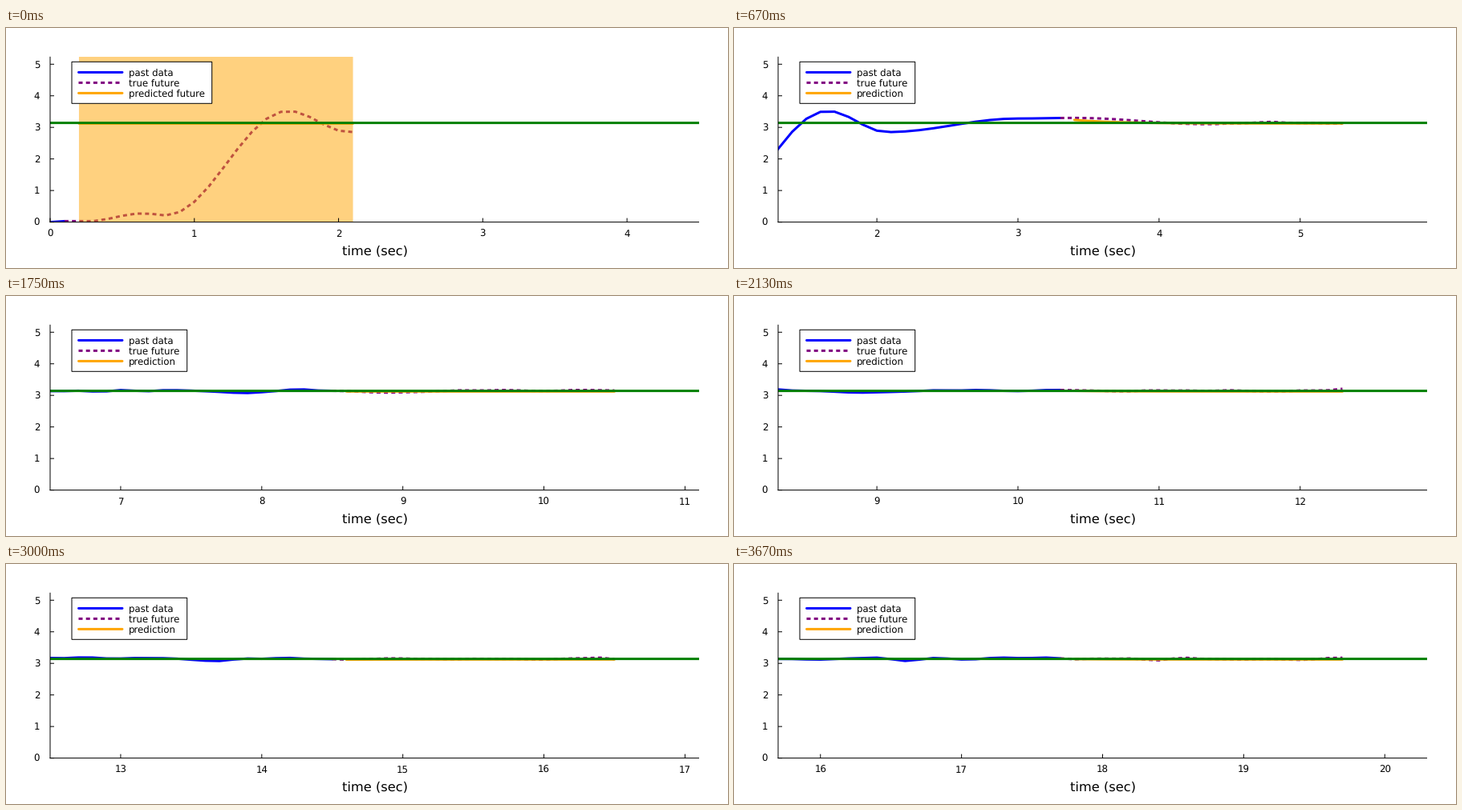
These frames come from a looping animation (900x300 px, 3.71 s). A matplotlib script:

```python
import math
import numpy as np
import matplotlib.pyplot as plt
from matplotlib.animation import FuncAnimation
from matplotlib.patches import Rectangle

W, H, DPI = 900, 300, 100
PX = 72 / DPI                                # points per pixel
LEFT, RIGHT, TOP, BOTTOM = 55, 864, 35.8, 242.6
V_MAX = 5.24
GOAL = math.pi
STEP = 0.1                                   # seconds between samples
HORIZON = 20                                 # predicted samples
SAMPLES = 198

plt.rcParams.update({"font.family": "DejaVu Sans", "path.snap": False,
                     "text.hinting": "no_hinting"})


def make_truth(times):
    """Swing up between turning points, then wobble around the goal."""
    turns = [(0, 0), (0.15, .04), (0.25, .02), (0.65, .28), (0.8, .21),
             (1.65, 3.52), (2.07, 2.85), (3.0, 3.28), (3.4, 3.30),
             (4.35, 3.10), (4.6, 3.14)]
    t, v = np.array(turns).T
    part = np.interp(times, t, np.arange(len(t)))
    whole = np.floor(part)
    eased = whole + (1 - np.cos(math.pi * (part - whole))) / 2
    swing = np.interp(eased, np.arange(len(t)), v)

    noise = np.random.default_rng(4).normal(0, 0.025, len(times))
    smooth = np.convolve(noise, np.array([1, 2, 1]) / math.sqrt(6), "same")
    return swing + np.where(times > t[-1], smooth, 0)


times = np.arange(SAMPLES) * STEP
truth = make_truth(times)

fig = plt.figure(figsize=(W / DPI, H / DPI), dpi=DPI, facecolor="white")
plot = fig.add_axes([LEFT / W, 1 - BOTTOM / H,
                     (RIGHT - LEFT) / W, (BOTTOM - TOP) / H])
plot.set_ylim(0, V_MAX)
plot.axis("off")
deco = fig.add_axes([0, 0, 1, 1])            # pixel coordinates, y down
deco.set_xlim(0, W)
deco.set_ylim(H, 0)
deco.axis("off")

SOLID = dict(lw=3 * PX, solid_capstyle="round", solid_joinstyle="round")
DASHED = dict(lw=3 * PX, ls=(0, (5 / 3, 4.2 / 3)), dash_capstyle="butt")


def rule(x0, y0, x1, y1):
    return deco.plot([x0, x1], [y0, y1], color="black", lw=PX, zorder=3,
                     solid_capstyle="butt")[0]


def label(x, y, text, size=11.8, **kw):
    return deco.text(x, y, text, fontsize=size * PX, va="baseline",
                     zorder=6, **kw)


past, = plot.plot([], [], color="blue", zorder=1, **SOLID)
future, = plot.plot([], [], color="purple", zorder=2, **DASHED)
band = plot.add_patch(Rectangle((0, 0), 1, V_MAX, fc="orange", ec="none",
                                alpha=0.5, zorder=3))
guess, = plot.plot([], [], color="orange", zorder=4, **SOLID)
plot.axhline(GOAL, color="green", lw=3 * PX, zorder=5)

# Axes
rule(LEFT, TOP, LEFT, BOTTOM + 0.5)
rule(LEFT - 0.5, BOTTOM, RIGHT, BOTTOM)
for v in range(6):
    y = BOTTOM - v * (BOTTOM - TOP) / V_MAX
    rule(LEFT, y, LEFT + 5, y)
    label(42.2, y + 4.3, str(v), ha="right")
label(460, 284, "time (sec)", 16.2, ha="center")
ticks = [(rule(0, BOTTOM, 0, BOTTOM - 5), label(0, 261.3, "", ha="center"))
         for _ in range(6)]

# Legend
box = deco.add_patch(Rectangle((82, 42.3), 174.7, 52, fc="white", ec="black",
                               lw=PX, zorder=4))
names = []
rows = [("past data", "blue", SOLID), ("true future", "purple", DASHED),
        ("predicted future", "orange", SOLID)]
for i, (name, color, style) in enumerate(rows):
    y = 55.4 + 13 * i
    deco.plot([90.5, 145], [y, y], color=color, zorder=5, **style)
    names.append(label(153, y + 4.2, name))


def predict(i, k):
    """Decay from the current angle to the goal, trusted more over time."""
    ahead = np.arange(1, HORIZON + 1)
    offset = (truth[i] - GOAL) * min(1, k / 10)
    return GOAL - 0.018 + offset * 0.72 ** ahead


def draw(n):
    k = (24 * n + 11) // 100                 # 24 steps per second
    i = 2 * k + 1                            # index of the current sample
    now = i * STEP
    early = i < HORIZON
    x0, x1 = (0, 4.5) if early else (now - 2, now + 2.6)
    plot.set_xlim(x0, x1)

    past.set_data(times[:i + 1], truth[:i + 1])
    ahead = slice(i, i + HORIZON + 1)
    future.set_data(times[ahead], truth[ahead])
    guess.set_data(now + STEP * np.arange(1, HORIZON + 1), predict(i, k))

    band.set_visible(early)
    band.set_x(now + STEP)
    band.set_width(STEP * (HORIZON - 1))
    names[2].set_text("predicted future" if early else "prediction")
    box.set_width(174.7 if early else 143.7)

    first = math.ceil(x0)
    for m, (mark, text) in enumerate(ticks):
        t = first + m
        x = LEFT + (t - x0) / (x1 - x0) * (RIGHT - LEFT)
        mark.set_visible(t <= x1)
        text.set_visible(t <= x1)
        mark.set_xdata([x, x])
        text.set_x(x)
        text.set_text(str(t))
    return []


anim = FuncAnimation(fig, draw, frames=371, interval=10, repeat=True,
                     repeat_delay=0, init_func=lambda: draw(0))
plt.show()
```
